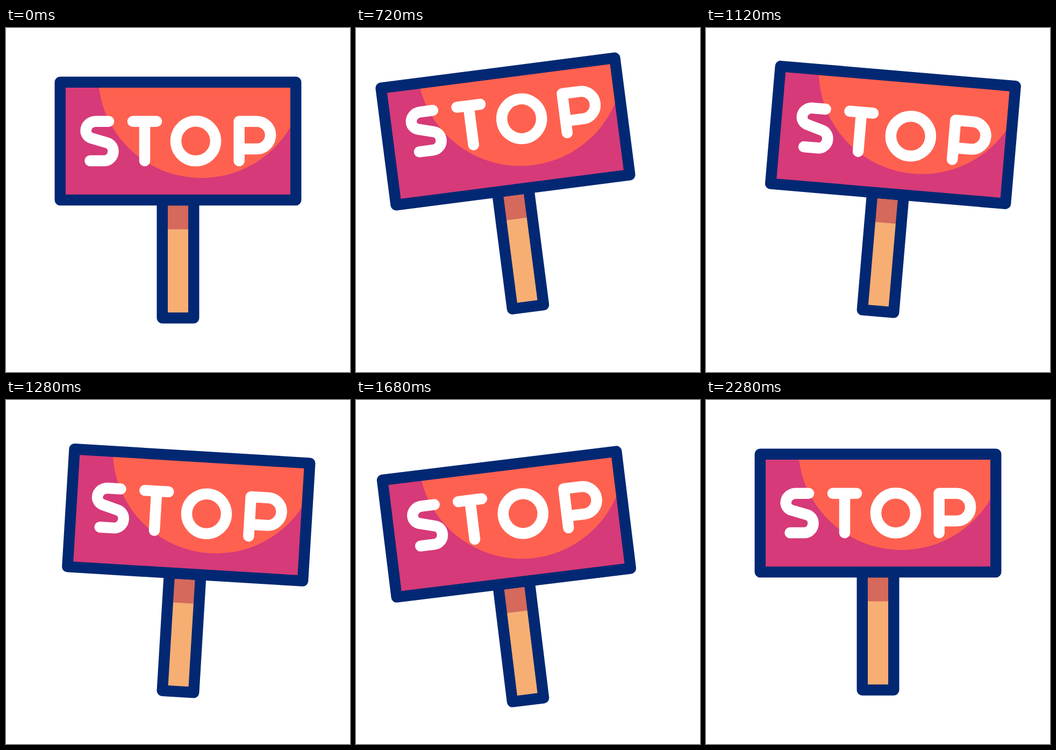
An HTML page for the animation above (2.4 s loop, 640 by 640 pixels).

```html
<!DOCTYPE html>
<html lang="en">
<head>
<meta charset="utf-8">
<title>Stop sign</title>
<style>
  html, body { margin: 0; width: 100%; height: 100%; overflow: hidden; background: #fff; }
  svg { display: block; width: 100%; height: 100%; }
  .outline { fill: none; stroke: #022873; stroke-width: 20.5; stroke-linejoin: round; }
  .letters { fill: none; stroke: #fff; stroke-width: 20.5; stroke-linecap: round; stroke-linejoin: round; }
</style>
</head>
<body>
<svg viewBox="0 0 640 640" role="img" aria-label="STOP">
  <defs>
    <clipPath id="panel"><rect x="100" y="100" width="440" height="220"/></clipPath>
  </defs>
  <g id="sign">
    <rect x="291" y="320" width="58" height="219" fill="#f6ae73"/>
    <rect x="291" y="320" width="58" height="54.5" fill="#d4695c"/>
    <rect class="outline" x="290.75" y="320" width="58.5" height="219.5"/>
    <g clip-path="url(#panel)">
      <rect x="101" y="101" width="438" height="219" fill="#d63a78"/>
      <circle cx="363.5" cy="87" r="192" fill="#ff6150"/>
    </g>
    <rect class="outline" x="100.75" y="100.75" width="438.5" height="219.25"/>
    <g id="word" class="letters">
      <path d="M191 173.7H167C157 173.7 148.5 181.5 148.5 191C148.5 197.5 153 203 159 205L188 213.5C195 215.5 199.5 222 199.5 229.5C199.5 239 192 247 183 247H156.5"/>
      <path d="M236 173.7H280M258 173.7V247"/>
      <circle cx="353" cy="210.3" r="37"/>
      <path d="M433.7 247V173.7H466.5A25.6 25.6 0 0 1 466.5 225H433.7"/>
    </g>
  </g>
</svg>
<script>
const LOOP = 2400, STEP = 40;
const PIVOT = "320 539.5";
const sign = document.getElementById("sign");
const word = document.getElementById("word");

// Turning points as [time in ms, value]
const tilt = [[205, 0], [590, -9.1], [1155, 5], [1690, -7], [2200, 0]];
const lift = [[270, 0], [880, -24.5], [1570, 19.5], [2250, 0]];

// The word hops twice inside the board
const HOP = { start: 360, period: 800, count: 2, height: 20 };

const easeSine = u => (1 - Math.cos(Math.PI * u)) / 2;

function swing(keys, t) {
  const next = keys.findIndex(([time]) => time > t);
  if (next < 1) return 0;
  const [t0, v0] = keys[next - 1], [t1, v1] = keys[next];
  return v0 + (v1 - v0) * easeSine((t - t0) / (t1 - t0));
}

function hop(t) {
  const cycles = (t - HOP.start) / HOP.period;
  return cycles > 0 && cycles < HOP.count ? -HOP.height * easeSine(2 * cycles) : 0;
}

function draw(now) {
  const t = Math.floor((now % LOOP) / STEP) * STEP;
  sign.setAttribute("transform", `translate(0 ${swing(lift, t)}) rotate(${swing(tilt, t)} ${PIVOT})`);
  word.setAttribute("transform", `translate(0 ${hop(t)})`);
}

let start;
function tick(now) {
  start ??= now;
  draw(now - start);
  requestAnimationFrame(tick);
}
draw(0);
requestAnimationFrame(tick);
</script>
</body>
</html>
```
